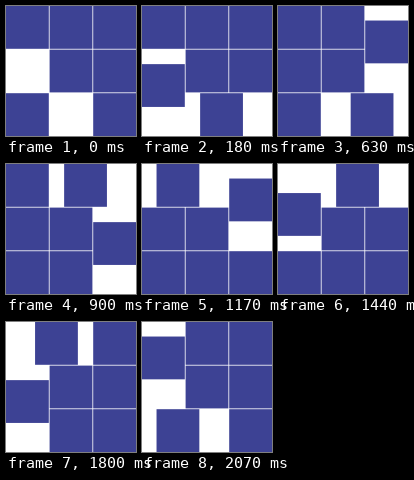
Animation, 130 px wide and 130 px high, one loop 2.16 s. Source, as an HTML page with a canvas:

```html
<!DOCTYPE html>
<html lang="en">
<head>
<meta charset="utf-8">
<title>Sliding tiles</title>
<style>
  html, body { margin: 0; width: 100%; height: 100%; overflow: hidden; background: #fff; }
  canvas { display: block; }
</style>
</head>
<body>
<canvas width="130" height="130"></canvas>
<script>
const ctx = document.querySelector('canvas').getContext('2d');
const SIZE = 130, TILE = 42.8, PITCH = (SIZE - TILE) / 2;
const STEP_MS = 90, STEPS = 6, TURNS = 4;
const start = performance.now();

function tile(col, row) {
  ctx.fillRect(col * PITCH, row * PITCH, TILE, TILE);
}

function draw(time) {
  const step = Math.floor(time / STEP_MS) % (STEPS * TURNS);
  const turn = Math.floor(step / STEPS);
  const shift = (step % STEPS) / 3; // in cells, 0 to 2

  ctx.resetTransform();
  ctx.fillStyle = '#fff';
  ctx.fillRect(0, 0, SIZE, SIZE);

  // Every turn repeats the same moves, a quarter counterclockwise further.
  ctx.translate(SIZE / 2, SIZE / 2);
  ctx.rotate(-turn * Math.PI / 2);
  ctx.translate(-SIZE / 2, -SIZE / 2);

  ctx.fillStyle = '#3d4294';
  for (let col = 0; col < 3; col++) tile(col, 0);
  tile(1, 1);
  tile(0, 2 - Math.min(shift, 1));
  tile(2 - shift, 2);
  tile(2, Math.max(shift, 1));
}

function frame() {
  draw(performance.now() - start);
  requestAnimationFrame(frame);
}
frame();
</script>
</body>
</html>
```
